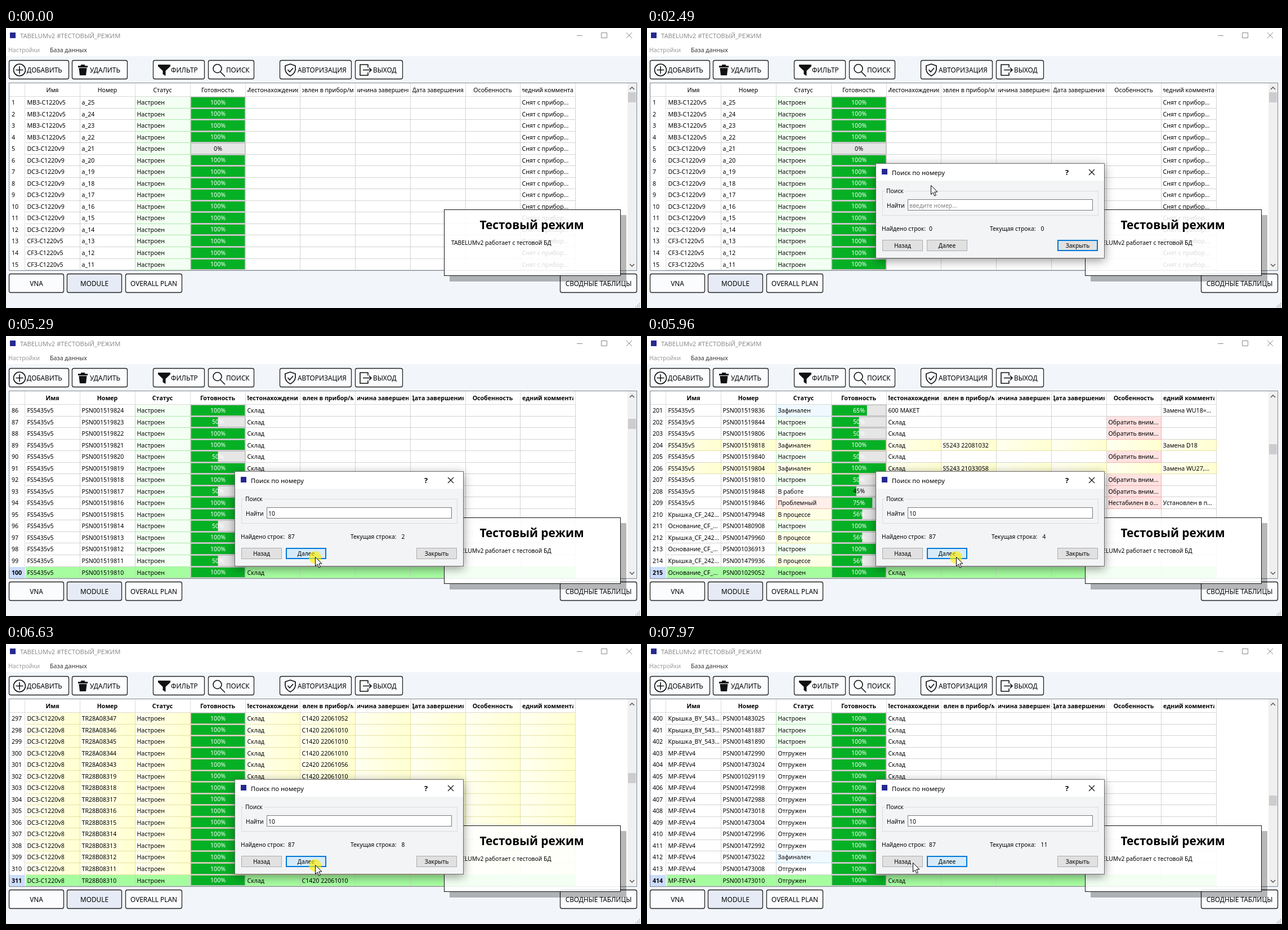
Animation, 1128 px wide and 497 px high, one loop 8000 ms. Source, as an HTML page with a canvas:

```html
<!DOCTYPE html>
<html lang="ru">
<head>
<meta charset="utf-8">
<title>Поиск по номеру</title>
<style>
  html, body { margin: 0; width: 100%; height: 100%; overflow: hidden; background: #fff; }
  canvas { display: block; }
</style>
</head>
<body>
<canvas id="stage" width="1128" height="497"></canvas>
<script>
const c = document.getElementById('stage').getContext('2d');
const LOOP = 8000, TICK = 96.1;
const APP = 'TABELUMv2';
const ROW_H = 20.54, TOP = 122, VISIBLE = 15;
const colX = i => Math.round(33.5 + i * 97.75);
const HEADERS = ['Имя', 'Номер', 'Статус', 'Готовность', 'Местонахождение',
  'Установлен в прибор/модуль', 'Причина завершения', 'Дата завершения', 'Особенность', 'Последний комментарий'];

// Search hits: [tick, current hit, row of the hit]
const HITS = [[52, 1, 16], [55, 2, 100], [58, 3, 213], [61, 4, 215], [63, 5, 240], [65, 6, 262],
  [67, 7, 283], [68, 8, 311], [70, 9, 352], [72, 10, 405], [82, 11, 414]];

// Pointer path: [tick, x, y]
const PATH = [[2, 752, 434], [3, 506, 462], [4, 500, 520], [6, 516, 520], [7, 513, 467], [9, 484, 395],
  [11, 446, 318], [13, 423, 260], [15, 410, 130], [17, 403, 80], [22, 402, 77], [24, 413, 101],
  [25, 462, 200], [26, 504, 279], [27, 507, 305], [28, 507, 315], [45, 507, 315], [47, 530, 354],
  [49, 549, 392], [72, 549, 392], [73, 540, 402], [75, 430, 419], [77, 266, 416], [79, 385, 398], [81, 472, 388]];

const CLICKS = [19, 29, 50, ...HITS.slice(1).map(h => h[0])];

// name | number | status | percent | place | device | feature | comment
const WARN = 'Обратить вним...';
const LID = 'Крышка_CF_242...', BASE = 'Основание_CF_...';
const ROWS = {
  201: 'FS5435v5|PSN001519836|Зафинален|65|600 МАКЕТ||| Замена WU18=...',
  202: `FS5435v5|PSN001519844|Настроен|50|Склад||${WARN}`,
  203: `FS5435v5|PSN001519806|Настроен|50|Склад||${WARN}`,
  204: 'FS5435v5|PSN001519818|Зафинален|100|Склад|S5243 22081032||Замена D18',
  205: `FS5435v5|PSN001519840|Настроен|50|Склад||${WARN}`,
  206: 'FS5435v5|PSN001519804|Зафинален|100|Склад|S5243 21033058||Замена WU27,...',
  207: `FS5435v5|PSN001519810|Настроен|50|Склад||${WARN}`,
  208: `FS5435v5|PSN001519848|В работе|45|Склад||${WARN}`,
  209: 'FS5435v5|PSN001519846|Проблемный|75|Склад||Нестабилен в о...|Установлен в п...',
  210: LID + '|PSN001479948|В процессе|56|Склад',
  211: BASE + '|PSN001480908|Настроен|100|Склад',
  212: LID + '|PSN001479960|В процессе|56|Склад',
  213: BASE + '|PSN001036913|Настроен|100|Склад',
  214: LID + '|PSN001479936|В процессе|56|Склад',
  215: BASE + '|PSN001029052|Настроен|100|Склад',
};
const LID_NUMBERS = ['483025', '481887', '481890'];
const SHIPPED = ['472990', '473024', '029119', '472998', '472988', '473018', '473004', '472996', '472992',
  '473022', '473008', '473010'];

function rowData(n) {
  if (ROWS[n]) {
    const cells = ROWS[n].split('|').map(s => s.trim());
    return { cells, done: n === 204 || n === 206 };
  }
  if (n <= 16) {
    const name = n < 5 ? 'MB3-C1220v5' : n < 13 ? 'DC3-C1220v9' : 'CF3-C1220v5';
    return { cells: [name, 'a_' + (26 - n), 'Настроен', n === 5 ? 0 : 100, '', '', '', 'Снят с прибор...'] };
  }
  if (n < 201) return { cells: ['FS5435v5', 'PSN00151' + (9910 - n), 'Настроен', n % 3 ? 100 : 50, 'Склад'] };
  if (n < 391) {
    const number = n < 302 ? 'TR28A08' + (644 - n) : 'TR28B08' + (621 - n);
    const device = n === 297 ? 'C1420 22061052' : n === 301 ? 'C2420 22061056' : 'C1420 22061010';
    return { cells: ['DC3-C1220v8', number, 'Настроен', 100, 'Склад', device], done: true };
  }
  if (n < 403) {
    const number = LID_NUMBERS[n - 400] || 481900 + (n * 7) % 90;
    return { cells: ['Крышка_BY_543...', 'PSN001' + number, 'Настроен', 100, 'Склад'] };
  }
  return { cells: ['MP-FEVv4', 'PSN001' + SHIPPED[n - 403], n === 412 ? 'Зафинален' : 'Отгружен', 100, 'Склад'] };
}

const STATUS_TINT = {
  'Настроен': ['#f3fff3', '#a9e9a9'], 'Зафинален': ['#f0f9ff', '#b5dcf0'],
  'Проблемный': ['#ffeeea', '#f3b9ae'], 'В процессе': ['#ffffe6', '#e9e79c'],
};

function text(s, x, y, size = 10.6, color = '#000', align = 'left', bold = false) {
  c.font = `${bold ? 'bold ' : ''}${size}px "Noto Sans", "Open Sans", sans-serif`;
  c.textAlign = align;
  c.fillStyle = color;
  c.fillText(s, x, y + size * 0.36);
}
function rect(x, y, w, h, fill, stroke, width = 1) {
  if (fill) { c.fillStyle = fill; c.fillRect(x, y, w, h); }
  if (stroke) {
    c.strokeStyle = stroke; c.lineWidth = width;
    c.strokeRect(x + width / 2, y + width / 2, w - width, h - width);
  }
}
function path(d, x, y, stroke, width = 1, fill) {
  const shape = new Path2D(d);
  c.save();
  c.translate(x, y);
  if (fill) { c.fillStyle = fill; c.fill(shape); }
  if (stroke) { c.strokeStyle = stroke; c.lineWidth = width; c.lineJoin = 'round'; c.stroke(shape); }
  c.restore();
}
function clipped(x, y, w, h, draw) {
  c.save(); c.beginPath(); c.rect(x, y, w, h); c.clip(); draw(); c.restore();
}
function blend(x, w, from, to) {
  const g = c.createLinearGradient(x, 0, x + w, 0);
  g.addColorStop(0, from); g.addColorStop(1, to);
  return g;
}
function toolButton(x, y, w, h, label, textX, align = 'left', fill = '#fbfcfe') {
  c.beginPath(); c.roundRect(x + 0.5, y + 0.5, w - 1, h - 1, 3);
  c.fillStyle = fill; c.fill();
  c.strokeStyle = '#222'; c.lineWidth = 1.3; c.stroke();
  text(label, textX, y + h / 2 + 0.5, 11.8, '#000', align);
}

function drawWindow(active) {
  rect(0, 0, 1128, 497, '#f2f6fa');
  rect(0, 0, 1128, 50, '#fff');
  rect(7, 8, 10, 10, '#25298f');
  const ink = active ? '#000' : '#8c8c8c';
  text(APP + ' #ТЕСТОВЫЙ_РЕЖИМ', 25, 13.5, 11.2, ink);
  path('M1014 13.5h10M1057.5 8.5h10v9h-10zM1102 8l10 10M1112 8l-10 10', 0, 0, active ? '#000' : '#8a8a8a');
  text('Настройки', 4, 39.5, 10.6, '#9b9b9b');
  text('База данных', 78, 39.5, 10.6, '#333');

  toolButton(5, 57, 107, 34, 'ДОБАВИТЬ', 37);
  path('M34.5 74.5a10.5 10.5 0 1 1-21 0a10.5 10.5 0 1 1 21 0M24 68v13M17.5 74.5h13', 0, 0, '#111', 1.6);
  toolButton(117, 57, 99, 34, 'УДАЛИТЬ', 149);
  path('M128 67h5v-2h7v2h5v3h-17zM129.500 71h14l-1.500 13h-11z', 0, 0, null, 1, '#111');
  toolButton(261, 57, 92, 34, 'ФИЛЬТР', 293);
  path('M270 65h22v3l-8.500 8v9l-5-3v-6l-8.500-8z', 0, 0, null, 1, '#111');
  toolButton(359, 57, 82, 34, 'ПОИСК', 391);
  path('M383 72a7.500 7.500 0 1 1-15 0a7.500 7.500 0 1 1 15 0M381 78l8 8', 0, 0, '#111', 1.6);
  toolButton(486, 57, 128, 34, 'АВТОРИЗАЦИЯ', 518);
  path('M505 64l9 3v7q-1 7-9 11q-8-4-9-11v-7zM500.500 74l3.500 4l6-7', 0, 0, '#111', 1.7);
  toolButton(620, 57, 85, 34, 'ВЫХОД', 652);
  path('M643 70v-5h-14v19h14v-5M634 74.500h15M645 70.500l4 4l-4 4', 0, 0, '#111', 1.6);

  toolButton(5, 436, 98, 34, 'VNA', 54, 'center');
  toolButton(108, 436, 98, 34, 'MODULE', 157, 'center', '#e7ebf6');
  toolButton(212, 436, 101, 34, 'OVERALL PLAN', 262.5, 'center');
  toolButton(984, 436, 137, 34, 'СВОДНЫЕ ТАБЛИЦЫ', 1052.5, 'center');
  for (let i = 0; i < 3; i++)
    for (let j = 0; j <= i; j++) rect(1124 - j * 3, 488 + i * 3, 2, 2, '#bfbfbf');
}

function drawProgress(x, y, w, h, pct) {
  rect(x, y, w, h, '#e6e6e6', '#bcbcbc');
  rect(x + 1, y + 1, (w - 2) * pct / 100, h - 2, '#06b025');
  text(pct + '%', x + w / 2, y + h / 2, 10.6, pct < 50 ? '#000' : '#fff', 'center');
}

function drawRow(n, i, selected) {
  const y = Math.round(TOP + i * ROW_H), h = Math.round(TOP + (i + 1) * ROW_H) - y, mid = y + h / 2;
  const { cells, done } = rowData(n);
  if (selected) rect(6, y, 27, h, '#cbdcff');
  text(n, 10, mid, 10.6, '#000', 'left', selected);
  for (let k = 0; k < 10; k++) {
    const x = colX(k), w = colX(k + 1) - x;
    const value = k < 6 ? cells[k] : k > 7 ? cells[k - 2] : '';
    let fill = '#fff', edge = '#d3d3d3';
    if (done) { fill = blend(x, w, '#fffff2', '#ffffd0'); edge = '#e6e2a4'; }
    else if (k === 2 && STATUS_TINT[value]) [fill, edge] = STATUS_TINT[value];
    else if (k === 8 && value) { fill = '#ffe2e2'; edge = '#efb0b0'; }
    if (selected) { fill = '#a6fda0'; edge = '#b7deb2'; }
    rect(x + 1, y, w, h, fill);
    rect(x + 1, y + h - 1, w, 1, edge);
    rect(x + w, y, 1, h, edge);
    if (k === 2 && edge !== '#d3d3d3') rect(x, y, 1, h, edge);
    if (k === 3) drawProgress(x + 1, y, w - 1, h - 1, +value);
    else if (value) text(value, x + 3.5, mid);
  }
}

function drawTable(hit) {
  const selected = hit ? hit[2] : 0, first = hit ? selected - VISIBLE + 1 : 1;
  rect(5, 97, 1116, 334, '#fff', '#828790');
  clipped(6, 98, 1114, 332, () => {
    for (let i = 0; i < VISIBLE; i++) drawRow(first + i, i, first + i === selected);
    HEADERS.forEach((label, k) => {
      const x = colX(k), w = colX(k + 1) - x;
      clipped(x + 4, 98, w - 7, 23, () => text(label, x + w / 2, 110.5, 10.6, '#000', 'center', !!hit));
      rect(x + w, 98, 1, 24, '#dcdcdc');
    });
    rect(6, 121, 1005, 1, '#dadada');
    rect(33, 98, 1, 332, '#dcdcdc');
  });
  rect(1104, 98, 16, 332, '#f0f0f0');
  rect(1105, Math.round(114 + 0.3885 * (first - 1)), 14, 18, '#cdcdcd');
  path('M1108 109l4-4l4 4M1108 419l4 4l4-4', 0, 0, '#555', 1.5);
}

function drawBanner() {
  c.beginPath();
  c.rect(788, 332, 314, 118);
  c.rect(779, 322, 313, 118);
  c.save();
  const outside = new Path2D('M0 0H1128V497H0zM779 322H1092V440H779z');
  c.clip(outside, 'evenodd');
  rect(788, 332, 314, 118, 'rgba(0,0,0,.28)');
  c.restore();
  rect(778, 322, 314, 118, 'rgba(255,255,255,.86)', '#111');
  text('Тестовый режим', 934, 350, 20.8, '#000', 'center', true);
  text(APP + ' работает с тестовой БД', 791, 381, 10.3);
}

function dialogButton(x, label, isDefault, lit) {
  rect(x, 376, 72, 20, lit ? '#d5ebfb' : '#e1e1e1', isDefault ? '#0078d7' : '#adadad', isDefault ? 2 : 1);
  text(label, x + 36, 386.5, 10.3, '#000', 'center');
}

function drawDialog(n, hit) {
  const focused = n >= 30 && n < 50;
  const typed = n < 37 ? '' : n < 39 ? '1' : '10';
  c.save();
  c.shadowColor = 'rgba(0,0,0,.4)'; c.shadowBlur = 16; c.shadowOffsetY = 4;
  rect(406, 240, 407, 169, '#f3f4f6');
  c.restore();
  rect(406, 240, 407, 169, null, '#6c6c6c');
  rect(407, 241, 405, 30, '#fff');
  rect(417, 250, 10, 10, '#25298f');
  text('Поиск по номеру', 435, 256.5, 11.2);
  text('?', 746, 256, 13, '#000', 'center', true);
  path('M785 251l10 10M795 251l-10 10', 0, 0, '#111', 1.2);

  rect(418, 289, 384, 44, null, '#dcdcdc');
  rect(423, 284, 35, 10, '#f3f4f6');
  text('Поиск', 425, 289, 10.3);
  text('Найти', 426, 315.5, 10.3);
  rect(463, 304, 329, 20, '#fff', focused ? '#111' : '#7a7a7a', focused ? 1.4 : 1);
  text(typed || 'введите номер...', 466, 315.5, 10.3, typed ? '#000' : '#808080');
  if (focused && (n < 35 || (n >= 37 && n < 44))) rect(466 + typed.length * 6, 308, 1, 13, '#000');

  text('Найдено строк:', 417, 356, 10.3);
  text(hit ? 87 : 0, 501, 356, 10.3);
  const current = hit ? hit[1] : 0, shift = hit && current < 10 ? 3 : 0;
  text('Текущая строка:', 609 + shift, 356, 10.3);
  text(current, 699.5 + shift, 356, 10.3);

  dialogButton(418, 'Назад', focused, false);
  dialogButton(497, 'Далее', n >= 50, n >= 49);
  dialogButton(729, 'Закрыть', n < 30, false);
}

function drawPointer(n) {
  if (n < PATH[0][0]) return;
  let i = PATH.findIndex(p => p[0] > n);
  if (i < 0) i = PATH.length;
  const a = PATH[i - 1], b = PATH[i] || a, k = b === a ? 0 : (n - a[0]) / (b[0] - a[0]);
  const x = Math.round(a[1] + (b[1] - a[1]) * k), y = Math.round(a[2] + (b[2] - a[2]) * k);
  if (CLICKS.some(t => n === t || n === t + 1) && n < 83) {
    c.beginPath(); c.arc(x, y + 1, 11, 0, 7);
    c.fillStyle = 'rgba(255,238,0,.65)'; c.fill();
  }
  if (n >= 27 && n <= 46)
    path('M-4 -7.500h3l1 1l1-1h3M0 -6.500v13M-4 7.500h3l1-1l1 1h3', x - 0.5, y, '#000', 1);
  else
    path('M.5 .5v16l3.700-3.500l2.600 6l2.600-1.100l-2.600-5.900h5.200z', x, y, '#000', 1, '#fff');
}

function frame() {
  const n = Math.floor((performance.now() % LOOP + 10) / TICK);
  const hit = HITS.filter(h => h[0] <= n).pop();
  drawWindow(n >= 20 && n < 23);
  drawTable(hit);
  drawBanner();
  if (n >= 23) drawDialog(n, hit);
  drawPointer(n);
  requestAnimationFrame(frame);
}
frame();
</script>
</body>
</html>
```
